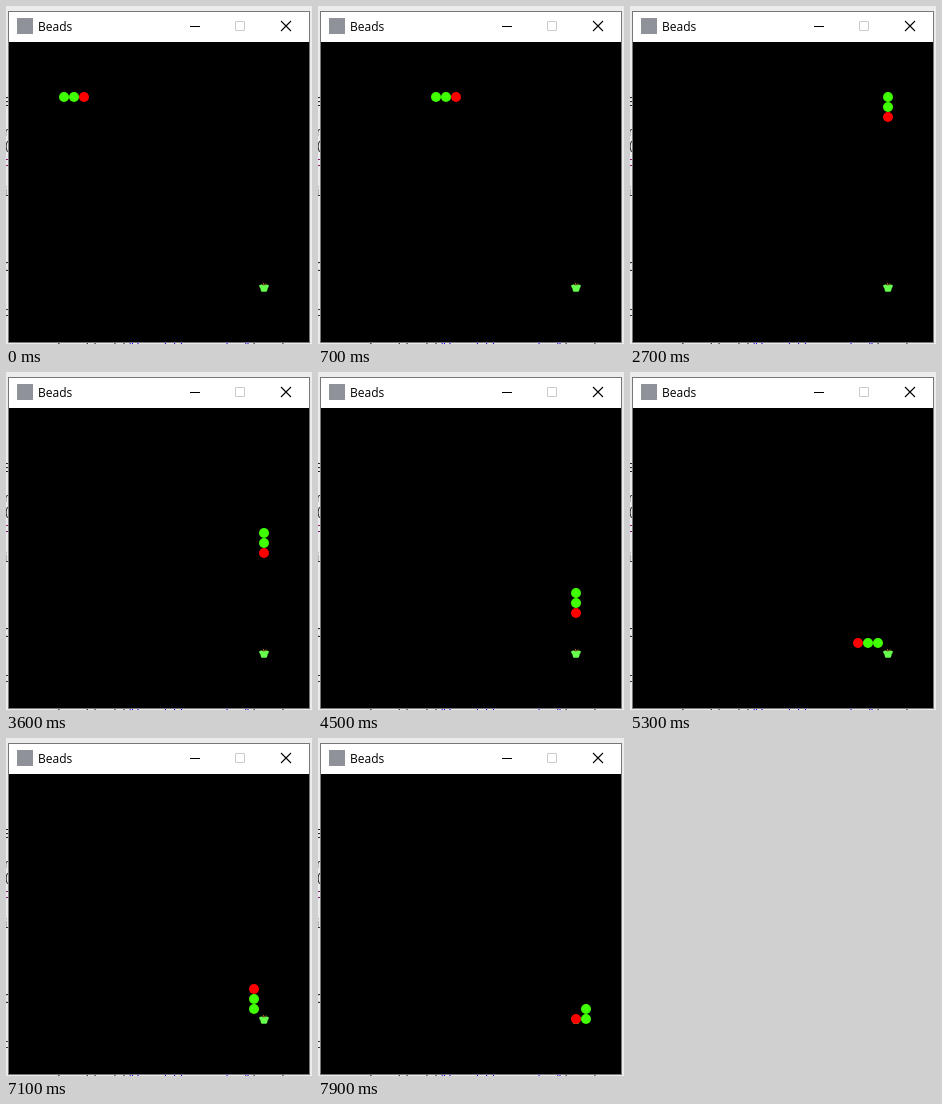
An HTML page that plays this animation: 306x338 px, repeating every 8000 ms.

```html
<!DOCTYPE html>
<html lang="en">
<head>
<meta charset="utf-8">
<title>Beads</title>
<style>
  html, body { margin: 0; width: 100%; height: 100%; overflow: hidden; background: #f2f2f2; }
  svg { display: block; width: 100%; height: 100%; }
  .title { font: 12px "Open Sans", "Noto Sans", sans-serif; }
  .code { font: 12px "DejaVu Sans Mono", "Liberation Mono", monospace; fill: #222; }
  .keyword { fill: #7f0055; }
  .string { fill: #2a00ff; }
  .body { fill: #40ff00; }
  .head { fill: #f00; }
</style>
</head>
<body>
<svg viewBox="0 0 306 338">
  <!-- editor behind the window -->
  <rect width="306" height="338" fill="#ececec"/>
  <g class="code">
    <text x="-3" y="100">E</text>
    <text x="-3" y="130">r</text>
    <text x="-3" y="145">(</text>
    <text x="-4" y="160" class="keyword">t</text>
    <text x="-4" y="190">i</text>
    <text x="-3" y="265">C</text>
    <text x="-4" y="310">t</text>
    <text x="6" y="345" xml:space="preserve">= <tspan class="keyword">new</tspan> Tweet(sub(<tspan class="string">"l sub(l scandir"</tspan>), e);</text>
  </g>

  <!-- window -->
  <rect x="2" y="5" width="302" height="332" fill="#777"/>
  <rect x="3" y="6" width="300" height="30" fill="#fff"/>
  <rect x="3" y="36" width="300" height="300"/>
  <rect x="11" y="12" width="16" height="16" fill="#8f9399"/>
  <text class="title" x="32" y="25">Beads</text>
  <g fill="none" stroke="#000">
    <path d="M184 20.5h10"/>
    <path d="M229.5 15.5h9v9h-9z" stroke="#ccc"/>
    <path d="M275 15l10 10M285 15l-10 10" stroke-width="1.1"/>
  </g>

  <!-- board of 10px cells -->
  <g transform="translate(3 36)">
    <g transform="translate(250 240)">
      <path d="M.2 3.2Q2.5 2 5 3.2Q7.5 2 9.8 3.2Q10 5 8.7 6.3Q8.6 8.5 7.4 9.8H2.6Q1.5 8.5 1.4 6.3Q0 5 .2 3.2Z" fill="#66ff4d"/>
      <path d="M5 3.4L4.2 .8M5 3.4L7 1.4" fill="none" stroke="#a5622a"/>
    </g>
    <circle class="body" r="5"/>
    <circle class="body" r="5"/>
    <circle class="head" r="5"/>
  </g>
</svg>
<script>
  const LOOP = 8000, TICK = 100;
  // Ticks on which the crawler stays put
  const pauses = [6, 9, 13, 16, 20, 23, 27, 30, 34, 37, 40, 44, 47, 50, 54, 57, 61, 64, 68, 71, 74, 78];
  const turns = 'R20 D18 L5 D2 R4 U4 R2 D3 L1';
  const dirs = { R: [1, 0], L: [-1, 0], D: [0, 1], U: [0, -1] };
  const dots = document.querySelectorAll('circle');

  const path = [[5, 5]];
  for (const turn of turns.split(' ')) {
    const [dx, dy] = dirs[turn[0]];
    for (let n = +turn.slice(1); n > 0; n--) {
      const [x, y] = path[path.length - 1];
      path.push([x + dx, y + dy]);
    }
  }

  function draw(now) {
    const tick = Math.floor(now % LOOP / TICK);
    const moves = tick - pauses.filter(p => p <= tick).length;
    dots.forEach((dot, i) => {
      const [x, y] = path[moves + i];
      dot.setAttribute('cx', x * 10 + 5);
      dot.setAttribute('cy', y * 10 + 5);
    });
  }

  let start;
  function frame(now) {
    start ??= now;
    draw(now - start);
    requestAnimationFrame(frame);
  }
  draw(0);
  requestAnimationFrame(frame);
</script>
</body>
</html>
```
